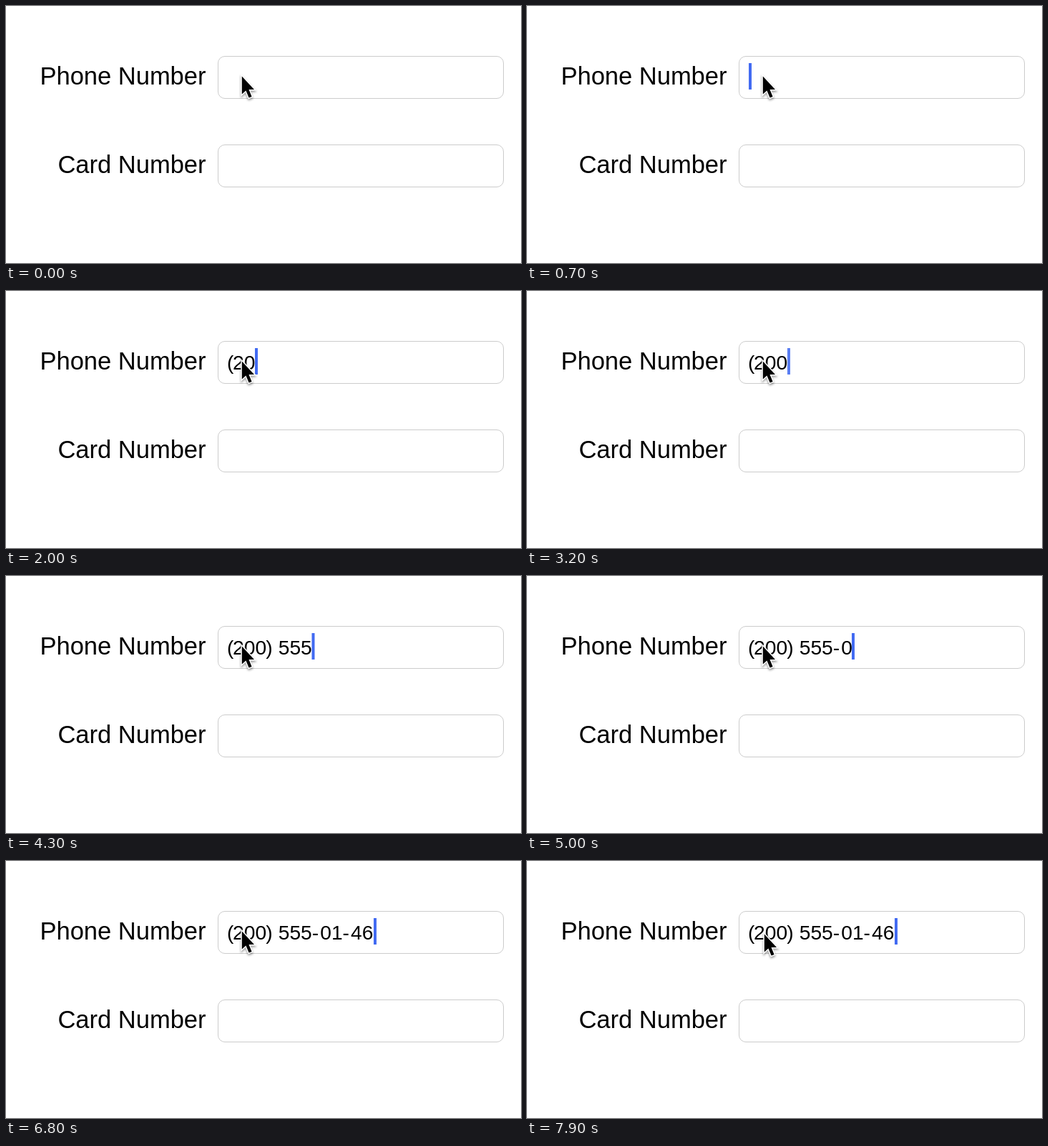
Animation, 720 px wide and 360 px high, one loop 8000 ms. Source, as an HTML page:

```html
<!DOCTYPE html>
<html lang="en">
<head>
<meta charset="utf-8">
<title>Phone field</title>
<style>
  html, body { margin: 0; width: 100%; height: 100%; overflow: hidden; background: #fff; }
  svg { display: block; width: 720px; height: 360px; font-family: "Liberation Sans", Arial, sans-serif; }
  .label { font-size: 34.5px; text-anchor: end; }
  .field { fill: #fff; stroke: #ccc; }
  #value { font-size: 28.2px; white-space: pre; }
  #pointer { filter: drop-shadow(0 2px 1.5px rgba(0, 0, 0, .4)); }
</style>
</head>
<body>
<svg viewBox="0 0 720 360">
  <rect width="720" height="360" fill="#fff"/>
  <text class="label" x="279.5" y="110">Phone Number</text>
  <text class="label" x="279.5" y="234">Card Number</text>
  <rect class="field" x="296.5" y="70.5" width="399" height="59" rx="9.5"/>
  <rect class="field" x="296.5" y="194.5" width="399" height="59" rx="9.5"/>
  <text id="value" y="110"></text>
  <rect id="caret" y="80" width="4" height="37" fill="#426bf2"/>
  <g id="menu">
    <path d="M240 -20V28Q240 44 256 44H293L311.5 62L330 44H366Q382 44 382 28V-20Z" fill="#363636"/>
    <text x="311.5" y="18" font-size="28.4" text-anchor="middle" fill="#f6f6f6">Paste</text>
  </g>
  <path id="pointer" d="M329.8 98.6V123.6L335.4 118.4L339.6 128.6L343.6 127L339.5 117H347Z"
        stroke="#fff" stroke-width="3" paint-order="stroke"/>
</svg>
<script>
const LOOP = 8000, TICK = 100;
const NUMBER = "(200) 555-01-46";
const START = 310;

// time, characters typed, caret x
const steps = [
  [700, 0, 310], [1800, 3, 348], [2700, 4, 364], [3600, 7, 396],
  [4000, 8, 412], [4300, 9, 427.5], [4900, 11, 454], [5800, 12, 470],
  [6300, 14, 498], [6800, 15, 514]
];
const blinks = [2300, 3200, 5300, 7300];
const fade = [.87, .45, 0, 0, 0, .5];

const el = id => document.getElementById(id);
const value = el("value"), caret = el("caret"), menu = el("menu"), pointer = el("pointer");

const advance = c => ({ "(": 7.1, ")": 7.1, " ": 9.4, "-": 11.4 })[c] || 15.7;

function glyphPositions(text) {
  let x = START;
  return [...text].map(c => {
    const at = "()".includes(c) ? x - 1 : x;
    x += advance(c);
    return at.toFixed(1);
  });
}
value.setAttribute("x", glyphPositions(NUMBER).join(" "));

function caretOpacity(t, typedAt) {
  const blink = blinks.findLast(b => b <= t && b > typedAt);
  return blink === undefined ? 1 : fade[(t - blink) / TICK] ?? 1;
}

function draw(time) {
  const t = Math.floor(time % LOOP / TICK) * TICK;
  const step = steps.findLast(s => s[0] <= t);
  const [typedAt, count, x] = step || [0, 0, START];

  value.textContent = NUMBER.slice(0, count);
  caret.setAttribute("x", x);
  caret.setAttribute("opacity", step ? caretOpacity(t, typedAt) : 0);
  menu.setAttribute("opacity", t === 1800 ? 1 : t === 1900 ? .4 : 0);

  const drift = Math.max(0, (t - 7700) / 200);
  pointer.setAttribute("transform", `translate(${2 * drift} ${4 * drift})`);
}

const began = performance.now();
function frame() {
  draw(performance.now() - began);
  requestAnimationFrame(frame);
}
frame();
</script>
</body>
</html>
```
